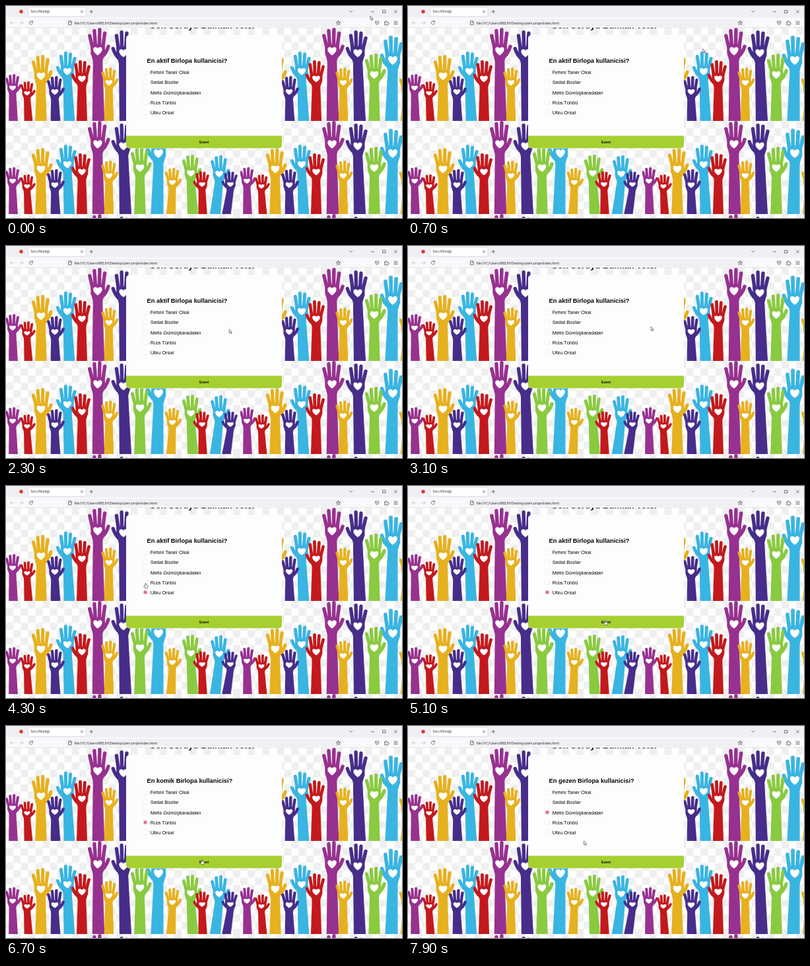
Write an HTML page that moves like this. It is 600 px wide and 321 px high and loops after 8 s.

```html
<!DOCTYPE html>
<html lang="tr">
<head>
<meta charset="utf-8">
<title>Soru Etkinligi</title>
<style>
  html, body { margin: 0; width: 100%; height: 100%; overflow: hidden; background: #fff; }
  svg { display: block; width: 600px; height: 321px; }
  .ui { font-family: "Open Sans", "Noto Sans", sans-serif; fill: #1c1c24; }
  .page { font-family: "Liberation Sans", Arial, sans-serif; fill: #050505; }
  .bold { font-weight: 700; }
  .line { fill: none; stroke: #4a4a52; stroke-width: .75; stroke-linecap: round; stroke-linejoin: round; }
  .faint { stroke: #bcbcc2; }
</style>
</head>
<body>
<svg viewBox="0 0 600 321" xmlns="http://www.w3.org/2000/svg">
  <defs>
    <pattern id="checks" width="22.19" height="22.19" patternUnits="userSpaceOnUse">
      <path d="M11.1 0h11.1v11.1H11.1zM0 11.1h11.1v11.1H0z" fill="#efefef"/>
    </pattern>
    <clipPath id="view"><rect y="33" width="600" height="288"/></clipPath>
    <clipPath id="tileClip"><rect width="355" height="141"/></clipPath>
    <clipPath id="cardClip"><rect x="182" y="44" width="236" height="171.5" rx="5"/></clipPath>
    <g id="tile" clip-path="url(#tileClip)">
      <rect width="355" height="141" fill="url(#checks)"/>
    </g>
  </defs>

  <g clip-path="url(#view)">
    <rect y="33" width="600" height="288" fill="#fff"/>
    <g id="wall"></g>
    <text id="heading" class="page bold" x="218" font-size="13.1">Son Soruyu Bulmak Yeter</text>
  </g>

  <g clip-path="url(#cardClip)">
    <rect x="182" y="44" width="236" height="172" fill="#fdfdfe"/>
    <rect id="button" x="182" y="196.5" width="236" height="19" />
    <path id="dashes" d="M182 196.6H418M182 215H418" stroke="#c9487f" stroke-width=".8" stroke-dasharray="1.6 1.2"/>
  </g>
  <text id="question" class="page bold" x="213.5" y="86.2" font-size="9.35"></text>
  <g id="options"></g>
  <text id="label" class="page bold" y="208" font-size="5.2"></text>
  <g id="thumb" transform="translate(325 206.2)">
    <path d="M-3-.4h1.5L.3-3.2q1.2-.2.9 1.2L.9-.9h2q.9.6.4 1.4.3.7-.3 1.2 0 .8-.8 1H-1.4L-3 2.2z" fill="#f5b32c" stroke="#7a4a18" stroke-width=".4"/>
  </g>

  <g id="chrome">
    <rect width="600" height="18" fill="#f0f0f4"/>
    <rect y="17.5" width="600" height="15.5" fill="#f9f9fb"/>
    <path d="M0 32.7H600" stroke="#d6d6dc" stroke-width=".6"/>
    <circle cx="23" cy="8.5" r="2.7" fill="#d83a2e"/>
    <rect x="33.5" y="2" width="87.5" height="13.8" rx="1.6" fill="#fff" stroke="#c9c9d2" stroke-width=".6"/>
    <text class="ui" x="37.6" y="10.4" font-size="4.7">Soru Etkinligi</text>
    <rect x="92" y="19.8" width="418" height="11.4" rx="1.6" fill="#f0f0f4"/>
    <text class="ui" x="103.5" y="27.5" font-size="5.12">file:///C:/Users/MELIH/Desktop/yeni proje/index.html</text>
    <g class="line">
      <path d="M113.5 7l3 3m0-3l-3 3M127 8.5h4.6M129.3 6.2v4.6"/>
      <path d="M520.7 7.2l2.1 2.1 2.1-2.1M553.5 8.7h4M571 6.6h4v4h-4zM588.4 6.6l4 4m0-4l-4 4"/>
      <path class="faint" d="M12 25.5H6.5m2.3-2.4L6.4 25.5l2.4 2.4"/>
      <path class="faint" d="M20.5 25.5H26m-2.3-2.4 2.4 2.4-2.4 2.4"/>
      <path d="M40 23.7a2.6 2.6 0 1 0 .4 2.6M40.4 22.5v1.8h-1.9"/>
      <path d="M95.2 22.9h2.5l1.4 1.4v3.9h-3.9zM97.7 22.9v1.4h1.4"/>
      <path d="M503.5 22.4l.9 2 2.2.2-1.7 1.5.5 2.1-1.9-1.1-1.9 1.1.5-2.1-1.7-1.5 2.2-.2z"/>
      <path d="M559.8 23.2h5v2.2q-.3 2.2-2.5 2.9-2.2-.7-2.5-2.9zM561.2 25l1.1 1.1 1.1-1.1"/>
      <path d="M573.8 24.2h1.5q-.3-1.6.9-1.6t.9 1.6h1.6v1.5q1.6-.3 1.6.9t-1.6.9v1.3h-4.9v-1.6q1.4 0 1.4-.9t-1.4-.8z"/>
      <path d="M588 23.4h5M588 25.5h5M588 27.6h5"/>
    </g>
  </g>

  <g id="cursor">
    <path id="arrow" d="M0 0V5.9L1.4 4.7 2.4 6.8 3.3 6.4 2.4 4.3H4.2z" fill="#fff" stroke="#222" stroke-width=".55" stroke-linejoin="round"/>
    <path id="finger" d="M-.7.5Q0-.5.7.5V2.9L3.2 3.6Q3.7 3.9 3.6 4.6L3 7.5H-.8L-2.8 4.9Q-2.5 3.9-1.6 4.4L-.7 5z" fill="#fff" stroke="#222" stroke-width=".55" stroke-linejoin="round"/>
  </g>
</svg>

<script>
const LOOP = 8000, STEP = 100;
const $ = id => document.getElementById(id);

function add(parent, tag, attrs, text) {
  const el = document.createElementNS("http://www.w3.org/2000/svg", tag);
  for (const key in attrs) el.setAttribute(key, attrs[key]);
  if (text) el.textContent = text;
  parent.append(el);
  return el;
}

// ---- wall of raised hands ----
const COLORS = { p: "#97318f", y: "#e6b11f", i: "#472d8a", b: "#39b5e2", r: "#c3191d", g: "#89ca40" };

// colour, heart x, heart y, height above the heart, arm foot x, thumb side
const HANDS = [
  ["p", 139, 35, 35, 140, 1], ["i", 178, 38, 34, 181, -1], ["b", 231, 49, 37, 229, -1],
  ["b", 93, 66, 30, 96, -1], ["g", 203, 71, 32, 203, 1], ["y", 53, 73, 32, 53, 1],
  ["r", 115, 77, 28, 115, -1], ["g", 280, 79, 28, 283, 1], ["b", 323, 80, 28, 317, 1],
  ["y", 156, 83, 23, 156, 1], ["p", 10, 91, 21, 11, 1], ["y", 252, 93, 22, 250, 1],
  ["r", 297, 96, 20, 298, -1], ["i", 340, 96, 20, 334, -1], ["i", 74, 97, 24, 75, 1],
  ["r", 32, 99, 18, 34, 1]
];

function drawHand([hue, x, y, rise, foot, side]) {
  const k = rise / 36.5, w = .35 + .65 * k; // short hands are broader
  const fill = COLORS[hue], wrist = y + 14 * k;
  add($("tile"), "path", {
    fill,
    d: `M${x - 7.4 * w} ${wrist}L${foot - 9.5 * w} 141H${foot + 9.5 * w}L${x + 7.4 * w} ${wrist}z`
  });
  const g = add($("tile"), "g", { fill, transform: `translate(${x} ${y}) scale(${w * side} ${k})` });
  add(g, "path", { d: "M-11-9Q0-13 11-9L11.5 4Q9 10 7.4 16H-7.4Q-9 10-11 4z" });
  add(g, "path", {
    d: "M-8.2-6L-12.6-24M-3.6-8L-5.2-32M2.6-8L3-33.7M8-6L11-28M7 9Q13 4 16.5-7",
    fill: "none", stroke: fill, "stroke-width": 5.6, "stroke-linecap": "round"
  });
  add(g, "path", {
    fill: "#fff",
    d: "M0 7C-9 1-8-6-3.7-6-1.2-6 0-4.5 0-3.2 0-4.5 1.2-6 3.7-6 8-6 9 1 0 7z"
  });
}
HANDS.forEach(drawHand);
for (const y of [33, 174, 315])
  for (const x of [0, 355]) add($("wall"), "use", { href: "#tile", x, y });

// ---- quiz ----
const PEOPLE = ["Fehmi Taner Oluk", "Sedat Bozlar", "Melis Gümüşkaradalan", "Rıza Tünbü", "Utku Orsal"];
const TOPICS = ["aktif", "komik", "gezen"];
const rowY = i => 100.5 + i * 15.1;

const dots = PEOPLE.map((name, i) => {
  const cy = rowY(i);
  add($("options"), "circle", { cx: 211, cy, r: 4, fill: "#fff", stroke: "#e9e6ec", "stroke-width": .7 });
  add($("options"), "text", { class: "page", x: 218.7, y: cy + 2.8, "font-size": 7.5 }, name);
  return add($("options"), "circle", { cx: 211, cy, r: 2.6, fill: "#ea62a4" });
});

// time, topic, chosen row, button focused
const STATES = [
  [0, 0, -1, false], [4000, 0, 4, false], [5200, 1, -1, true],
  [6000, 1, 3, false], [6800, 2, -1, true], [7400, 2, 2, false]
];

// time, pointer x, pointer y
const PATH = [
  [0, 552, 15], [200, 552, 15], [1300, 308.5, 130], [1900, 308.5, 130], [2700, 368, 122],
  [3200, 368, 122], [3800, 211, 161], [4100, 211, 161], [4300, 211.5, 147], [4400, 211.5, 147],
  [5000, 299, 203], [5300, 299, 203], [5700, 219, 152.5], [5900, 211, 146], [6100, 211, 146],
  [6600, 297, 202], [6900, 297, 202], [7300, 211, 131], [7500, 211, 131], [7900, 266.5, 174],
  [8000, 266.5, 174]
];

function pointerAt(t) {
  const n = PATH.findIndex(p => p[0] > t);
  const [t0, x0, y0] = PATH[n - 1], [t1, x1, y1] = PATH[n];
  const u = (t - t0) / (t1 - t0), e = u * u * (3 - 2 * u);
  return [x0 + (x1 - x0) * e, y0 + (y1 - y0) * e];
}

function isClickable(x, y) {
  const onButton = x > 182 && x < 418 && y > 196 && y < 215;
  const onRow = x > 206 && x < 297 && PEOPLE.some((_, i) => Math.abs(y - rowY(i)) < 4.5);
  return onButton || onRow;
}

const show = (el, on) => el.setAttribute("visibility", on ? "visible" : "hidden");

function render(t) {
  const [, topic, chosen, focused] = STATES.filter(s => s[0] <= t).pop();
  $("question").textContent = `En ${TOPICS[topic]} Birlopa kullanicisi?`;
  dots.forEach((dot, i) => show(dot, i === chosen));
  $("options").setAttribute("transform", `translate(0 ${focused ? -.5 : 0})`);
  $("heading").setAttribute("y", focused ? 33.2 : 34.4);
  $("button").setAttribute("fill", focused ? "#eb69a5" : "#a6d030");
  $("label").textContent = focused ? "Event, Son Kararim" : "Event";
  $("label").setAttribute("x", focused ? 272 : 293);
  show($("dashes"), focused);
  show($("thumb"), focused);

  const [x, y] = pointerAt(t), hand = isClickable(x, y);
  $("cursor").setAttribute("transform", `translate(${x} ${y})`);
  show($("arrow"), !hand);
  show($("finger"), hand);
}

const start = performance.now();
function tick() {
  const t = (performance.now() - start) % LOOP;
  render(Math.floor(t / STEP) * STEP);
  requestAnimationFrame(tick);
}
tick();
</script>
</body>
</html>
```
